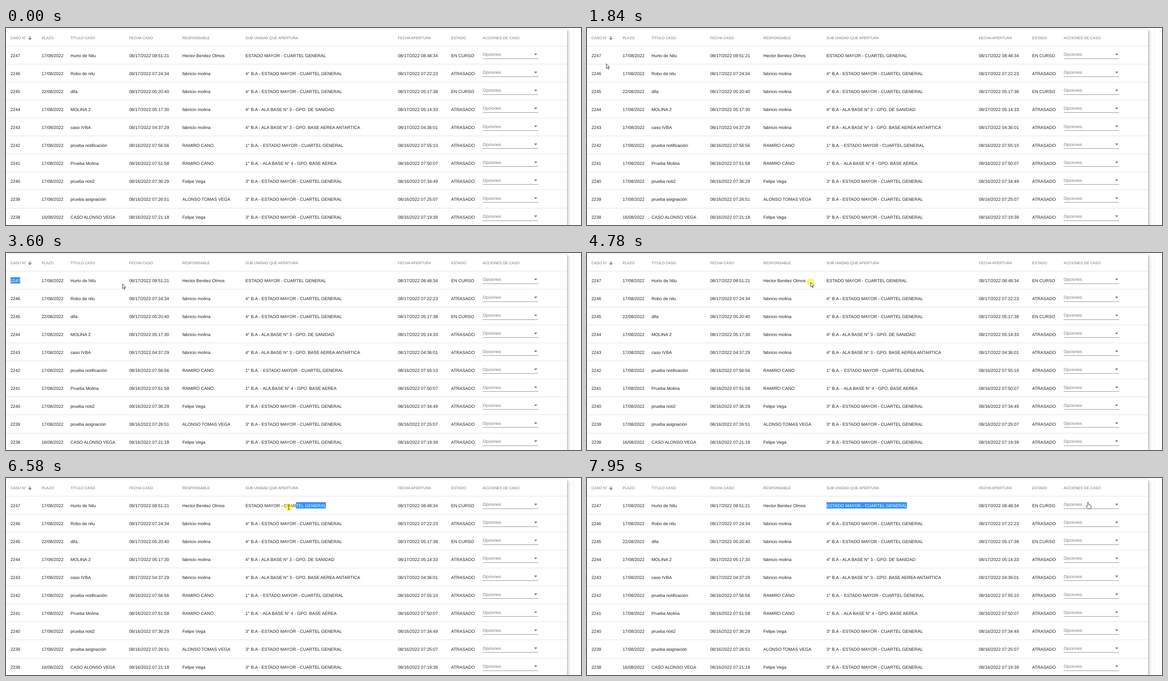
An HTML page that plays this animation: 1275 px wide and 439 px high, repeating every 8000 ms.

```html
<!DOCTYPE html>
<html lang="es">
<head>
<meta charset="utf-8">
<style>
  html, body { margin: 0; width: 100%; height: 100%; overflow: hidden; background: #fefefe; }
  #page { position: fixed; inset: 0; overflow: hidden; }
  .card { position: absolute; inset: 3px 31px 0 0; background: #fff;
    box-shadow: 0 0 2px rgba(0,0,0,.22), 3px 3px 6px rgba(0,0,0,.24); }
  svg { position: absolute; left: 0; top: 0; width: 100%; height: 100%; overflow: hidden; }
  text { font: 9.67px "Liberation Sans", Arial, sans-serif; fill: #212121; white-space: pre;
    text-rendering: geometricPrecision; }
  .head { font-size: 8.2px; fill: #757575; }
  .option { fill: #7c7c7c; }
  .selected { fill: #fff; }
  .cursor { fill: #fff; stroke: #222; stroke-width: .9; stroke-linejoin: round; }
</style>
</head>
<body>
<div id="page">
  <div class="card"></div>
  <svg id="stage"></svg>
</div>
<script>
const stage = document.getElementById('stage');
const ROW = 40.06;
const columns = {
  'CASO N°': 10, 'PLAZO': 79, 'TITULO CASO': 143, 'FECHA CASO': 273, 'RESPONSABLE': 391,
  'SUB UNIDAD QUE APERTURA': 531, 'FECHA APERTURA': 869, 'ESTADO': 987, 'ACCIONES DE CASO': 1057
};
// due day | title | opened | owner | unit | created | state; "HQ" and "ALA" are abbreviations
const rows = `17|Hurto de Nilu|08:51:21|Hector Benitez Olmos|HQ|08:48:34|EN CURSO
17|Robo de nilu|07:24:34|fabricio molina|4° B.A - HQ|07:22:23|ATRASADO
22|difa|05:20:40|fabricio molina|4° B.A - HQ|05:17:38|EN CURSO
17|MOLINA 2|05:17:30|fabricio molina|4° B.A - ALA 3 - GPO. DE SANIDAD|05:14:33|ATRASADO
17|caso IVBA|04:37:29|fabricio molina|4° B.A - ALA 3 - GPO. BASE AEREA ANTARTICA|04:36:01|ATRASADO
17|prueba notificación|07:56:56|RAMIRO CANO|1° B.A. - HQ|07:55:10|ATRASADO
17|Prueba Molina|07:51:58|RAMIRO CANO|1° B.A. - ALA 4 - GPO. BASE AEREA|07:50:07|ATRASADO
17|prueba noti2|07:36:29|Felipe Vega|3° B.A - HQ|07:34:49|ATRASADO
17|prueba asignación|07:26:51|ALONSO TOMAS VEGA|3° B.A - HQ|07:25:07|ATRASADO
16|CASO ALONSO VEGA|07:21:18|Felipe Vega|3° B.A - HQ|07:19:39|ATRASADO`
  .replaceAll('HQ', 'ESTADO MAYOR - CUARTEL GENERAL').replaceAll('ALA', 'ALA BASE N°')
  .replaceAll('ALA BASE N°', 'ALA BASE N°')
  .split('\n').map(row => row.split('|'));

function set(el, attrs) {
  for (const name in attrs) el.setAttribute(name, attrs[name]);
}
function add(tag, attrs, parent = stage) {
  const el = document.createElementNS('http://www.w3.org/2000/svg', tag);
  set(el, attrs);
  return parent.appendChild(el);
}
function label(x, y, content, cls = '') {
  const el = add('text', { x, y, class: cls });
  el.textContent = content;
  return el;
}
const line = (d, stroke) => add('path', { d, stroke, fill: 'none' });

// Table
line('M1258.5 0V439', '#ececec');
for (const name in columns) label(columns[name], 24.6, name, 'head');
add('path', { d: 'M53 18V25.5M49.7 22.3L53 25.6L56.3 22.3', stroke: '#555', 'stroke-width': 1.2, fill: 'none' });

const lefts = Object.values(columns);
const cells = [];
rows.forEach(([due, title, opened, owner, unit, created, state], r) => {
  const dy = r * ROW;
  const snap = Math.round(dy);
  const date = r < 5 ? '08/17/2022 ' : '08/16/2022 ';
  line(`M0 ${40.5 + snap}H1244`, '#e2e2e2');
  [2247 - r, due + '/08/2022', title, date + opened, owner, unit, date + created, state].forEach((content, i) => {
    const el = label(lefts[i], 64.7 + dy, content);
    cells.push({ el, x: lefts[i], y: 61 + dy, width: el.getComputedTextLength() });
  });
  label(1057, 62.3 + dy, 'Opciones', 'option');
  line(`M1057 ${68.5 + snap}H1180`, '#8f8f8f');
  add('path', { d: `M1171 ${57.3 + dy}h7l-3.5 3.7z`, fill: '#6f6f6f' });
});

// Moving parts
const clipBox = add('rect', { y: 54, height: 14 }, add('clipPath', { id: 'clip' }));
const highlight = add('rect', { y: 54, height: 14, fill: '#3390fb' });
const selectedText = label(0, 64.7, '', 'selected');
selectedText.setAttribute('clip-path', 'url(#clip)');
const halo = add('circle', { r: 8.5, fill: '#fff200', 'fill-opacity': .55 });
const cursor = add('path', { class: 'cursor' });
const shapes = {
  arrow: 'M.3 .3V10.8L2.7 8.6L4.4 12.5L6 11.8L4.3 8H7.6Z',
  beam: 'M-2 -5H2M0 -5V5M-2 5H2',
  hand: 'M-1.3 9V1.2a1.3 1.3 0 0 1 2.6 0V5.4L6 6.4Q7.5 7 7 9L6 14.6H-.2L-4.2 9.6Q-4 7.6 -2.6 8.2Z'
};

// Pointer moves; x slows down by the given power, y is steady
const moves = [
  { start: 390, end: 1150, x: 112, y: 178, power: 1.8 },
  { start: 1150, end: 1970, x: 38, y: 61, power: 1.5 },
  { start: 2040, end: 2780, x: 4, y: 62, power: 1 },
  { start: 2980, end: 3740, x: 315, y: 70, power: 1 },
  { start: 3740, end: 4580, x: 496, y: 65, power: 1.5 },
  { start: 4780, end: 5380, x: 385, y: 61, power: 1.5 },
  { start: 5640, end: 5850, x: 757, y: 76, power: 1.3 },
  { start: 5850, end: 6390, x: 733, y: 65, power: 1 },
  { start: 6390, end: 6990, x: 528, y: 65, power: 1.9 },
  { start: 7260, end: 7600, x: 800, y: 86, power: 1 },
  { start: 7600, end: 7950, x: 1111, y: 54, power: 1.5 }
];
const drags = [
  { cell: cells[0], press: 2040, release: 2980 },
  { cell: cells[4], press: 4780, release: 5640 },
  { cell: cells[5], press: 6390, release: 7260 }
];
const LAG = 35;

function pointerAt(t) {
  let x = 1024, y = 428;
  for (const m of moves) {
    if (t < m.start) break;
    const f = Math.min(1, (t - m.start) / (m.end - m.start));
    x += (m.x - x) * (1 - (1 - f) ** m.power);
    y += (m.y - y) * f;
  }
  return [x, y];
}

function cursorShape(x, y) {
  if (x > 1057 && x < 1180 && y > 48 && y < 69) return 'hand';
  const overText = cells.some(c => x >= c.x && x <= c.x + c.width && Math.abs(y - c.y) < 6);
  return overText ? 'beam' : 'arrow';
}

// Left edge of a selection dragged from the end of the text to x
function selectionStart({ el, x: left, width }, x) {
  for (let i = 0; i < el.getNumberOfChars(); i++) {
    const from = el.getStartPositionOfChar(i).x;
    if ((from + el.getEndPositionOfChar(i).x) / 2 >= x) return from;
  }
  return left + width;
}

function drawSelection(drag, t) {
  let x = 0, width = 0;
  if (drag) {
    const { cell, press, release } = drag;
    x = selectionStart(cell, pointerAt(Math.max(press, Math.min(t, release) - LAG))[0]);
    width = cell.x + cell.width - x;
    selectedText.textContent = cell.el.textContent;
    selectedText.setAttribute('x', cell.x);
  }
  set(highlight, { x, width });
  set(clipBox, { x, width });
}

function draw(t) {
  const [x, y] = pointerAt(t);
  const drag = drags.findLast(d => t >= d.press);
  drawSelection(drag, t);
  set(halo, { cx: x, cy: y, visibility: drag && t < drag.release ? 'visible' : 'hidden' });
  set(cursor, {
    d: shapes[cursorShape(x, y)],
    transform: `translate(${x} ${y})`,
    visibility: t >= 390 ? 'visible' : 'hidden'
  });
}

const began = performance.now();
function tick() {
  draw((performance.now() - began) % 8000);
  requestAnimationFrame(tick);
}
tick();
</script>
</body>
</html>
```
